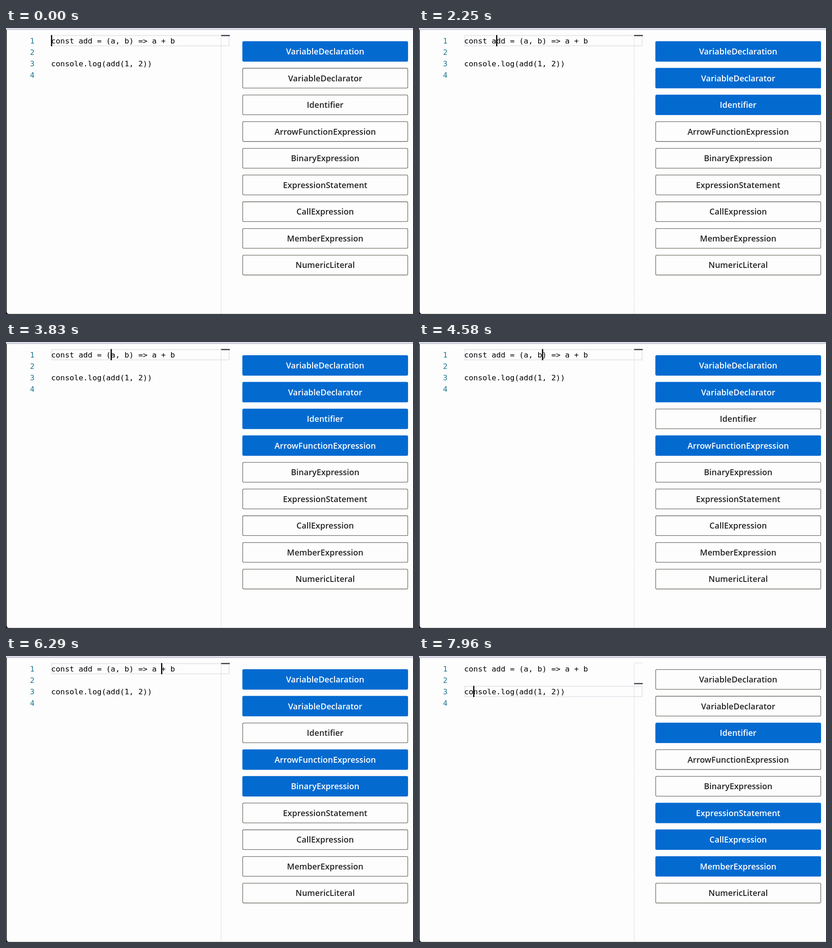
These frames come from a looping animation (892 by 627 pixels, 8000 ms). An HTML page:

```html
<!DOCTYPE html>
<html lang="en">
<head>
<meta charset="utf-8">
<title>Syntax nodes at the cursor</title>
<style>
  html, body { margin: 0; width: 100%; height: 100%; overflow: hidden; background: #fdfdfd; }
  svg { display: block; width: 892px; height: 627px; }
  .code { font: 16.7px "DejaVu Sans Mono", monospace; white-space: pre; }
  .number { fill: #237893; }
  .node rect { fill: #fdfdfd; stroke: #6c6c66; stroke-width: 1.3; }
  .node text { font: 600 18px "Open Sans", sans-serif; text-anchor: middle; fill: #242424; }
  .node.on rect { fill: #036ad0; stroke: #036ad0; }
  .node.on text { fill: #fff; }
</style>
</head>
<body>
<svg id="stage" viewBox="0 0 892 627"></svg>
<script>
const LOOP = 8000, FIRST_KEY = 528, KEY_INTERVAL = 238;
const CHAR = 10.054, LINE = 25, LEFT = 99;
const LINES = ["const add = (a, b) => a + b", "", "console.log(add(1, 2))", ""];

// Each node covers [line, start, end) ranges of the code.
const NODES = {
  VariableDeclaration: [[0, 0, 27]],
  VariableDeclarator: [[0, 6, 27]],
  Identifier: [[0, 6, 9], [0, 13, 14], [0, 16, 17], [0, 22, 23], [0, 26, 27],
               [2, 0, 7], [2, 8, 11], [2, 12, 15]],
  ArrowFunctionExpression: [[0, 12, 27]],
  BinaryExpression: [[0, 22, 27]],
  ExpressionStatement: [[2, 0, 22]],
  CallExpression: [[2, 0, 22]],
  MemberExpression: [[2, 0, 11]],
  NumericLiteral: [[2, 16, 17], [2, 19, 20]]
};

const stage = document.getElementById("stage");

function add(tag, attrs, parent = stage, text = "") {
  const el = document.createElementNS("http://www.w3.org/2000/svg", tag);
  for (const name in attrs) el.setAttribute(name, attrs[name]);
  el.textContent = text;
  return parent.appendChild(el);
}
const box = (x, y, width, height, fill, parent) =>
  add("rect", { x, y, width, height, fill }, parent);

// Window edges
box(0, 0, 892, 4, "#ececf4");
box(0, 0, 892, 1, "#c4c4d4");
box(0, 3, 892, 1, "#9c9cba");
box(0, 626, 892, 1, "#c6c6bc");
add("path", { d: "M0 4H1.5V621Q1.5 626 6 627H0Z", fill: "#111" });

// Editor
const highlight = add("rect", {
  x: 100, y: 16.5, width: 389, height: 22.5, fill: "none", stroke: "#eaeaf0", "stroke-width": 2.5
});
add("path", {
  d: "M490 15.5H471.5V627", fill: "none", stroke: "#c2c2c2", "stroke-dasharray": "1 1"
});
const marker = box(471.5, 0, 19, 2.5, "#3e3a48");
LINES.forEach((code, i) => {
  const y = 34 + i * LINE;
  add("text", { x: 52.5, y, class: "code number" }, stage, i + 1);
  add("text", { x: LEFT, y, class: "code" }, stage, code);
});
const caret = box(0, 15.5, 2.6, 24.5, "#000");

// Node list
const buttons = Object.entries(NODES).map(([name, ranges], i) => {
  const y = 29 + i * 58.55;
  const group = add("g", { class: "node" });
  add("rect", { x: 518.7, y: y + .7, width: 361.8, height: 43.4, rx: 2.5 }, group);
  add("text", { x: 699.5, y: y + 29 }, group, name);
  return { group, ranges };
});

// The right-arrow key walks through the code and wraps at line ends.
function caretAt(time) {
  let col = Math.max(0, Math.floor((time - FIRST_KEY) / KEY_INTERVAL));
  let line = 0;
  while (col > LINES[line].length) col -= LINES[line++].length + 1;
  return { line, col };
}

function draw(now) {
  const { line, col } = caretAt(now % LOOP);
  caret.setAttribute("x", LEFT - .4 + col * CHAR);
  caret.setAttribute("y", 15.5 + line * LINE);
  highlight.setAttribute("y", 16.5 + line * LINE);
  marker.setAttribute("y", 15.3 + line * 22);
  for (const { group, ranges } of buttons) {
    const on = ranges.some(([row, start, end]) => row === line && col >= start && col < end);
    group.classList.toggle("on", on);
  }
}

const begin = performance.now();
function tick() {
  draw(performance.now() - begin);
  requestAnimationFrame(tick);
}
tick();
</script>
</body>
</html>
```
